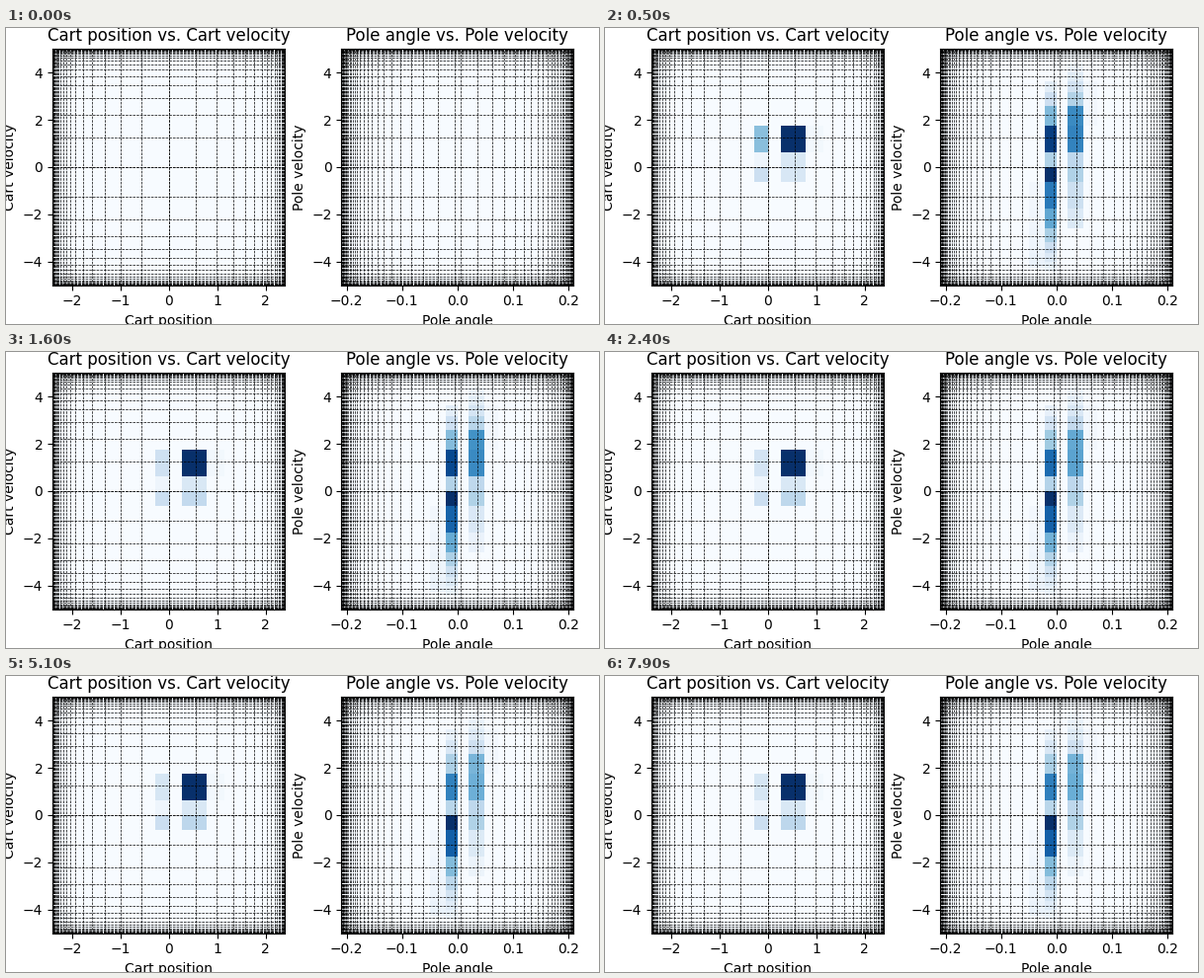
A matplotlib script for the animation above (8 s loop, 600 by 300 pixels).

```python
import numpy as np
import matplotlib.pyplot as plt
from matplotlib.animation import FuncAnimation

W, H, FRAMES, STEP = 600, 300, 80, 100
SIDE = 30  # bin points on each side of zero

plt.rcParams["font.family"] = "DejaVu Sans"


def bins(high, first=0, last=.001):
    """Points mirrored about zero, packed geometrically towards both ends."""
    half = high - np.geomspace(high - first, last, SIDE)
    return np.concatenate([-half[::-1], half])


def edges(points):
    mid = (points[1:] + points[:-1]) / 2
    return np.concatenate([[points[0]], mid, [points[-1]]])


def run(grid, col, row, step, start, ratio=1, n=1):
    """Fill n cells from (col, row), each one `ratio` times the last.

    Column -1 or row -1 lies just below zero, 0 just above.
    """
    for k in range(n):
        grid[SIDE + row + k * step, SIDE + col] = start * ratio ** k


def easings(i):
    fast = np.exp(-(i - 5) / 6) if i > 5 else 1
    slow = 1 / (1 + (i / 24) ** 4)
    sway = np.cos(2 * np.pi * (i - 79) / 34)
    return fast, slow, sway


def cart_density(i):
    grid = np.zeros((2 * SIDE, 2 * SIDE))
    if i:
        fast, _, _ = easings(i)
        run(grid, 1, 1, 1, 1)
        run(grid, 1, 0, 1, .15)
        run(grid, 1, -1, 1, .28 - .12 * fast)
        run(grid, -1, 1, 1, .165 + .26 * fast)
        run(grid, -1, 0, 1, .05)
        run(grid, -1, -1, 1, .22)
        run(grid, 2, 1, 1, .025)
    return grid


def pole_density(i):
    grid = np.zeros((2 * SIDE, 2 * SIDE))
    if i:
        fast, slow, sway = easings(i)
        # left column
        run(grid, -1, 1, 1, .66 + .27 * slow + .03 * sway, .48, 4)
        run(grid, -1, 0, 1, .29 + .03 * slow)
        run(grid, -1, -1, 1, 1)
        run(grid, -1, -2, 1, .82 - .1 * fast)
        run(grid, -1, -3, -1, .44 + .09 * slow, .64, 6)
        # right column
        run(grid, 1, 1, 1, .47 + .2 * slow + .03 * sway, .95, 2)
        run(grid, 1, 3, 1, .2 + .11 * slow, .6, 5)
        run(grid, 1, 0, 1, .27)
        run(grid, 1, -1, -1, .32, .42 + .25 * fast, 3)
        # faint outer columns
        run(grid, -2, -7, 1, .07, .85, 6)
        run(grid, 2, 2, 1, .03, 1, 3)
    return grid


fig = plt.figure(figsize=(W / 100, H / 100), dpi=100)


def panel(left, xs, xmax, xticks, name, quantity):
    ax = fig.add_axes([left / W, 39.3 / H, 235.1 / W, 239.4 / H])
    ys = bins(5)
    mesh = ax.pcolormesh(edges(xs), edges(ys), np.zeros((len(ys), len(xs))),
                         cmap="Blues", vmin=0, vmax=1)
    for x in xs:
        ax.axvline(x, color="k", ls="--", lw=.5)
    for y in ys:
        ax.axhline(y, color="k", ls="--", lw=.5)
    ax.set(xlim=(-xmax, xmax), ylim=(-5, 5), xticks=xticks,
           yticks=range(-4, 5, 2), xlabel=f"{name} {quantity}",
           ylabel=f"{name} velocity",
           title=f"{name} {quantity} vs. {name} velocity")
    return mesh


cart = panel(47, bins(2.4), 2.4, range(-2, 3), "Cart", "position")
pole = panel(339.2, bins(.2095, .005, .0018), .2095,
             np.arange(-2, 3) / 10, "Pole", "angle")


def draw(i):
    cart.set_array(cart_density(i))
    pole.set_array(pole_density(i))
    return cart, pole


anim = FuncAnimation(fig, draw, frames=FRAMES, interval=STEP,
                     repeat=True, repeat_delay=0, blit=False)
plt.show()
```
